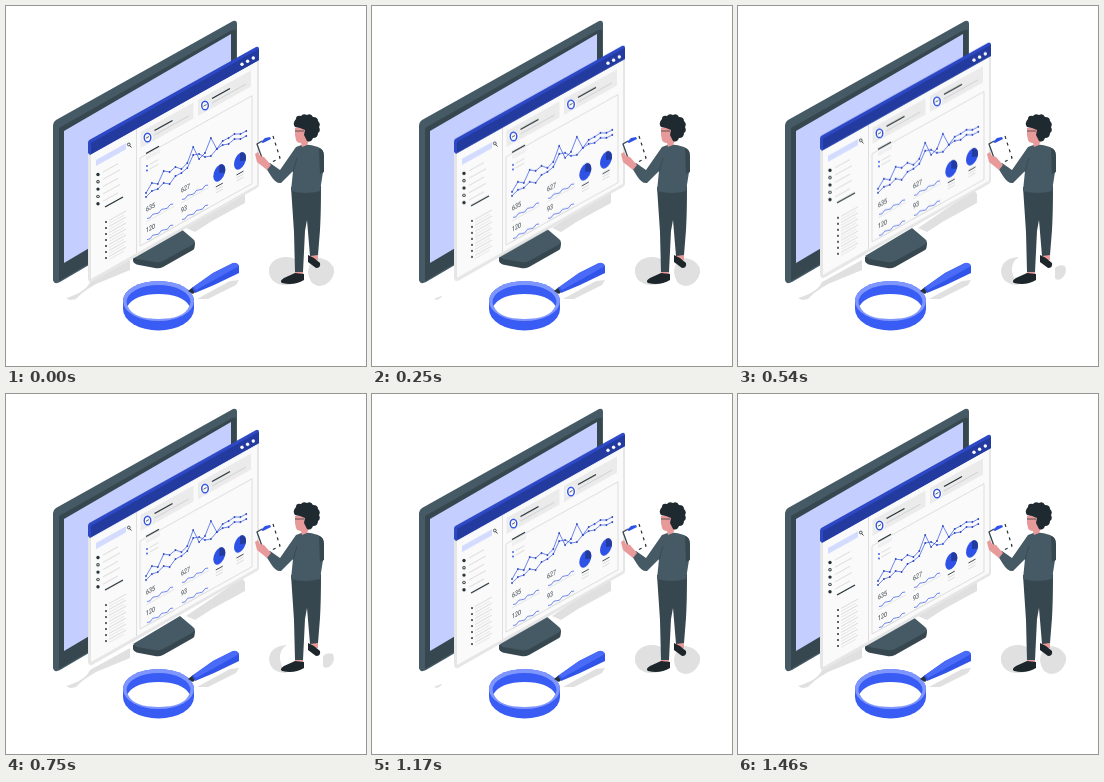
An HTML page that plays this animation: 360 by 360 pixels, repeating every 1.5 s.

```html
<!DOCTYPE html>
<html lang="en">
<head>
<meta charset="utf-8">
<title>Analytics desk</title>
<style>
html, body { margin: 0; width: 100%; height: 100%; overflow: hidden; background: #fff; }
svg { display: block; width: 100vw; height: 100vh; }
text { font-family: Roboto, Arial, sans-serif; }
</style>
</head>
<body>
<svg viewBox="0 0 360 360">
  <g id="shadows" fill="#e0e0e0">
    <path id="tail" d="M60 292Q80 286 84 276L124 254V264L90 278Q76 286 70 293Q64 295 60 292Z"/>
    <path d="M62 293L69 290L70 291L65 294Z"/>
    <path d="M180 222L236 184L239 188V197L206 215L189 226Z"/>
    <path d="M191 293L224 275L233 274L230 279L202 293Z"/>
    <path d="M281 251Q273 256 274 265Q275 273 281 279Q264 279 263 265Q264 252 281 251Z"/>
    <path d="M317 262Q321 258 327 260Q330 268 323 273Q318 275 317 272Z"/>
    <g id="feet">
      <ellipse cx="280" cy="265" rx="17" ry="14"/>
      <path d="M302 266Q303 253 314 252Q328 255 328 267Q324 280 312 280Q303 278 302 266Z"/>
    </g>
  </g>

  <g id="monitor">
    <path fill="#455a64" d="M47 119Q47 116 50 114L227 15Q231 14 231 18V172L54 276Q48 279 47 274Z"/>
    <path fill="#37474f" d="M53 122L224 25Q230 22 230 25V171L53 275Z"/>
    <path fill="#c5cfff" d="M58 125L225 28V158L58 257Z"/>
    <path fill="#37474f" d="M127 251V255Q128 258 133 259L149 262Q153 263 157 261L187 244Q189 243 189 236Z"/>
    <path fill="#455a64" d="M127 250L174 222L187 233Q191 236 186 239L157 255Q153 257 149 256L131 253Z"/>
  </g>

  <g id="float">
    <path fill="#e6e6e6" d="M82 146L253 48V179Q253 181 251 182L86 276Q83 277 82 273Z"/>
    <path fill="#fafafa" d="M85 148L251 54V179L85 273Z"/>
    <path fill="#2d48c4" d="M82 137Q82 134 85 133L250 41Q253 40 253 43V54L84 149L82 147Z"/>
    <path fill="#233a9e" d="M85 137L253 43V54L85 148Z"/>
    <g fill="#fff"><circle cx="236" cy="58.2" r="1.7"/><circle cx="241.6" cy="55.2" r="1.7"/><circle cx="247.3" cy="52" r="1.7"/></g>
    <g id="page"></g>
  </g>

  <g id="lens">
    <path fill="#385cf4" d="M117 295A35.500 20 0 0 1 188 295V303A35.500 21.500 0 0 1 117 303Z"/>
    <ellipse cx="152.500" cy="295" rx="35.500" ry="20" fill="#7f96ff"/>
    <ellipse cx="152.500" cy="296" rx="32" ry="17" fill="#385cf4"/>
    <path fill="#fff" d="M121.500 300Q129 288 152.500 288T183.500 300Q178 313 152.500 313T121.500 300Z"/>
    <path fill="#263238" d="M182 285L187 281L191 284L187 288Z"/>
    <path fill="#3053e8" d="M186 282L207 267L227 257Q233 257 233 261V267L208 279L189 287Z"/>
    <path fill="#4a6bf8" d="M187 281L207 267L227 257Q231 256 233 260L210 273L190 284Z"/>
  </g>

  <g id="person">
    <path fill="#e89a9a" d="M304 246H312V254H304ZM289 262H297V270H289Z"/>
    <path fill="#1c262b" d="M302 249L308 252L314 257Q315 262 310 262L302 256Z"/>
    <path fill="#1c262b" d="M289 267L298 268V274Q288 280 276 277Q273 275 278 272Z"/>
    <path fill="#37474f" d="M285 181L315 180Q315 207 314 224L312 249L304 250L301 214L299 225L297 266L289 266L288 226Z"/>
    <path fill="#455a64" d="M290 141Q299 136 312 141Q318 143 318 151L317 166L314 185Q300 189 285 185L287 165L275 177Q270 178 265 170L260 162L264 157L274 164Z"/>
    <path fill="#37474f" d="M313 142Q318 143 318 151V166L314 168Z"/>
    <path fill="none" stroke="#37474f" stroke-width=".8" d="M287 166L291 152"/>
    <path fill="#e89a9a" d="M289 122L300 120L304 132L301 139L296 141L295 137Q291 137 290 134L289 129Z"/>
    <path fill="#1f2a30" d="M289 121Q286 117 290 113Q290 109 295 110Q297 107 301 109Q305 107 307 111Q312 111 312 115Q315 118 313 121Q315 125 312 127Q312 132 307 132Q305 137 301 135L298 129L299 124L294 122Z"/>
    <path fill="none" stroke="#263238" stroke-width=".7" d="M289 125H298"/>
    <path fill="#fff" d="M251 138L267 130L274 152L259 159Z"/>
    <path fill="none" stroke="#37474f" stroke-width="1.300" d="M256 135L251 138L256 152"/>
    <path fill="none" stroke="#263238" stroke-width="1.200" stroke-dasharray="3 4" d="M267 130L274 152L260 159"/>
    <path fill="#2f52e6" d="M255 136L259 132L264 131L265 133L257 137Z"/>
    <path fill="#e89a9a" d="M249 148L252 146L254 150L258 151L265 159L261 164L251 156Z"/>
  </g>
</svg>
<script>
const SLOPE = -0.556, LOOP = 1500, LIFT = 5;
const INK = '#263238', BLUE = '#2f52e6', GREY = '#dcdcdc';
const $ = id => document.getElementById(id);

function add(tag, attrs, text) {
  const el = document.createElementNS('http://www.w3.org/2000/svg', tag);
  for (const k in attrs) el.setAttribute(k, attrs[k]);
  if (text) el.textContent = text;
  $('page').append(el);
  return el;
}
// Local axes lying in the plane of the window.
const plane = (x, y) => `matrix(.75 ${.75 * SLOPE} 0 1 ${x} ${y})`;
const slab = (x, y, w, h, fill, stroke = 'none') => add('path', {
  d: `M${x} ${y}l${w} ${w * SLOPE}v${h}l${-w} ${-w * SLOPE}z`, fill, stroke, 'stroke-width': .7
});
const rule = (x, y, w, color = GREY, width = 1) => add('path', {
  d: `M${x} ${y}l${w} ${w * SLOPE}`, stroke: color, 'stroke-width': width
});
const dot = (cx, cy, r, fill) => add('circle', { cx, cy, r, fill });

function sidebar() {
  slab(90, 154, 30, 6, '#d3dbff');
  add('circle', { cx: 122.8, cy: 138.5, r: 1.4, fill: 'none', stroke: INK, 'stroke-width': .8 });
  add('path', { d: 'M123.700 139.600l1.800 1.900', stroke: INK, 'stroke-width': .9 });
  for (let i = 0; i < 5; i++) {
    const y = 168.5 + i * 7.3;
    dot(92, y, 1.7, INK);
    if (i % 2) dot(92, y, .8, '#fafafa');
    rule(97, y - 2.5, i % 2 ? 17 : 15);
  }
  rule(99, 201, 18, INK, 1.3);
  for (let i = 0; i < 7; i++) {
    const y = 216 + i * 6;
    dot(100, y, 1, INK);
    rule(103, y - 1.5, 17);
    rule(103, y + 1.5, 15, '#e8e8e8');
  }
  add('path', { d: 'M130.500 123V247', stroke: '#dedede' });
}

function card(x, y, w) {
  slab(x, y, w, 16, '#ebebeb');
  add('circle', { cx: x + 7, cy: y + 5.5, r: 5.4, fill: '#fafafa' });
  add('ellipse', { cx: x + 7, cy: y + 5.5, rx: 3.3, ry: 4.3, fill: 'none', stroke: BLUE, 'stroke-width': 1.4 });
  rule(x + 5.5, y + 6.2, 3, INK, .8);
  rule(x + 14, y - 1.5, 18, INK, 1.3);
  rule(x + 14, y + 3, 34, '#d2d2d2');
}

function series(ys) {
  const pts = ys.map((y, i) => [140 + i * 5.9, y]);
  add('polyline', { points: pts.join(' '), fill: 'none', stroke: BLUE, 'stroke-width': .7 });
  for (const [x, y] of pts) dot(x, y, .9, '#2b46b8');
}

function stat(x, y, value) {
  add('text', { transform: plane(x, y), 'font-size': 7, fill: INK }, value);
  const wave = [...Array(10).keys()].map(i =>
    [x + 1 + i * 2.9, y + 6.5 + i * 2.9 * SLOPE + 1.2 * Math.sin(i * 2.1)]);
  add('polyline', { points: wave.join(' '), fill: 'none', stroke: BLUE, 'stroke-width': .7 });
  rule(x, y + 10, 28, '#e0e0e0', .7);
}

function pie(x, y) {
  add('circle', { r: 8, fill: BLUE, transform: plane(x, y) });
  add('path', { d: 'M0 0L0 -8A8 8 0 0 1 7.500 2.700Z', fill: '#233a9e', transform: plane(x, y) });
  rule(x - 3.5, y + 14, 7, INK, .9);
  rule(x - 3.5, y + 17, 7);
  rule(x - 3.5, y + 20, 7);
}

function chart() {
  slab(134, 152, 112, 88, '#fafafa', '#d2d2d2');
  rule(140, 147.5, 13, INK, 1.2);
  slab(140, 150.5, 14, 4, '#f0f0f0');
  for (const y of [160, 164.5]) {
    dot(141, y, .9, BLUE);
    rule(143.5, y - 1.4, 9);
  }
  series([187, 177, 178, 165, 166, 161, 163, 157, 141, 153, 147, 132, 143, 135, 132, 128, 128, 125]);
  series([191, 185, 183, 177, 178, 170, 167, 162, 149, 148, 151, 150, 143, 139, 138, 133, 133, 130]);
  stat(140, 206, '635');
  stat(175, 187, '627');
  stat(140, 227, '120');
  stat(175, 207, '93');
  pie(213.3, 167);
  pie(234, 155);
}

sidebar();
card(134.5, 126, 53);
card(192, 94, 53);
chart();

// The window hovers up and back once per loop.
$('float').animate(
  [{ transform: 'translateY(0px)' }, { transform: `translateY(${-LIFT}px)` }],
  { duration: LOOP / 2, direction: 'alternate', easing: 'ease-in-out', iterations: Infinity });

// Shadow changes are hard cuts: [time, opacity].
function cut(id, steps) {
  $(id).animate(
    [...steps, [LOOP, steps[0][1]]].map(([t, opacity]) => ({ offset: t / LOOP, opacity, easing: 'step-end' })),
    { duration: LOOP, iterations: Infinity });
}
cut('tail', [[0, 1], [160, 0], [400, 1], [1130, 0], [1290, 1]]);
cut('feet', [[0, 1], [440, 0], [880, 1]]);
</script>
</body>
</html>
```
